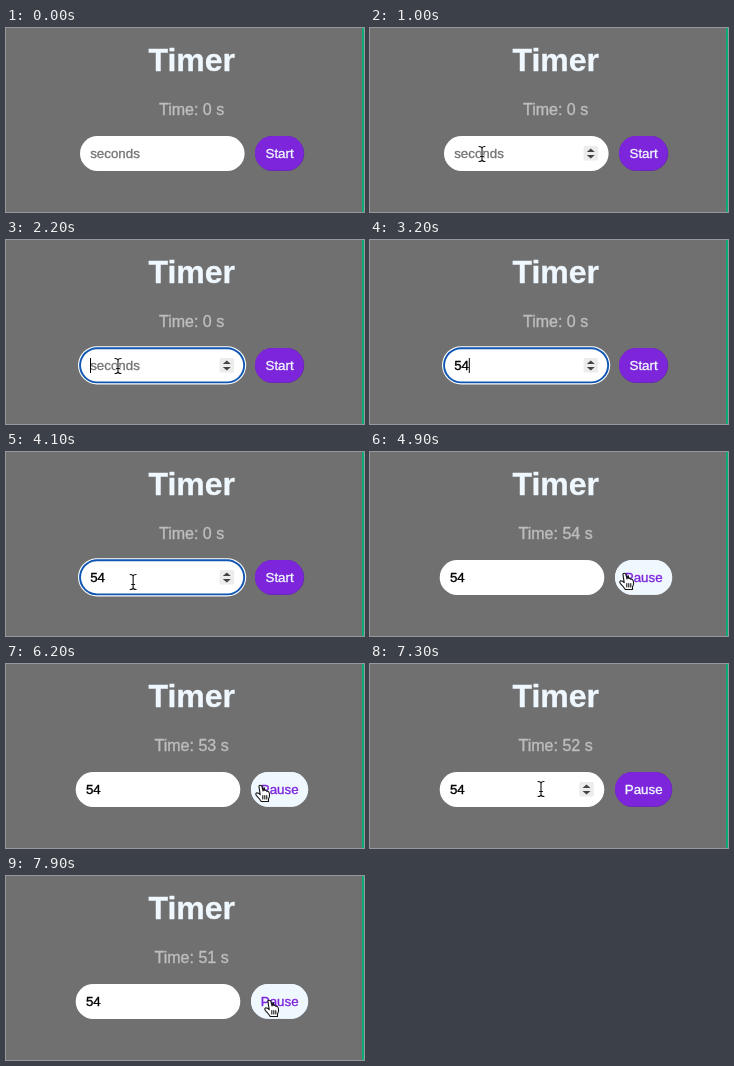
Animation, 358 px wide and 184 px high, one loop 8000 ms. Source, as an HTML page:

```html
<!DOCTYPE html>
<html lang="en">
<head>
<meta charset="utf-8">
<title>Timer</title>
<style>
  html, body { margin: 0; width: 100%; height: 100%; overflow: hidden; background: #707070; }
  svg { display: block; width: 358px; height: 184px; font-family: "Liberation Sans", Arial, sans-serif; font-size: 13.333px; }
  text { fill: currentColor; stroke: currentColor; stroke-width: .35px; }
  .halo { stroke: #fff; stroke-opacity: .8; stroke-width: 2.6; }
  .ink { stroke: #111; stroke-width: 1.1; }
</style>
</head>
<body>
<svg viewBox="0 0 358 184">
  <defs>
    <path id="beamShape" d="M-3-7.5Q0-7.5 0-5.5Q0-7.5 3-7.5M0-5.5V5.5M-3 7.5Q0 7.5 0 5.5Q0 7.5 3 7.5M-1.5 2.5H1.5"/>
  </defs>
  <rect width="358" height="184" fill="#707070"/>
  <rect x="356" width="2" height="184" fill="#0dab77"/>
  <text x="185.7" y="42.8" text-anchor="middle" font-size="32" font-weight="700" color="#f0f8ff">Timer</text>
  <text id="time" x="185.6" y="87" text-anchor="middle" font-size="16" color="#bebebe"></text>

  <g id="field">
    <g id="ring">
      <rect x="-2" y="106.2" width="168.2" height="38.2" rx="19.1" fill="#fff"/>
      <rect x="-.9" y="107.3" width="166" height="36" rx="18" fill="#0f56b3"/>
      <rect x="1" y="109.2" width="162.2" height="32.2" rx="16.1" fill="#fff"/>
    </g>
    <rect id="plain" y="108" width="164.6" height="35" rx="17.5" fill="#fff"/>
    <text id="value" x="10.2" y="130"></text>
    <rect id="caret" y="118" width="1" height="15"/>
    <g id="spinner">
      <rect x="139.6" y="118" width="14.5" height="14.5" rx="1.5" fill="#ececec"/>
      <path d="M142.8 124 146.8 120.4 150.8 124ZM142.8 127 146.8 130.6 150.8 127Z" fill="#444"/>
    </g>
  </g>

  <rect id="edge" y="108" height="35" rx="17.5"/>
  <rect id="face" y="108" height="34.5" rx="17.2"/>
  <text id="label" y="130" text-anchor="middle"></text>

  <g id="cursor" stroke-linejoin="round" stroke-linecap="round">
    <g id="beam" fill="none">
      <use href="#beamShape" class="halo"/>
      <use href="#beamShape" class="ink"/>
    </g>
    <path id="arrow" d="M0 0V13.5L3.2 10.6 5.4 15.2 7.5 14.2 5.4 9.8H9.8Z" stroke="#fff"/>
    <g id="hand" class="ink" fill="#fff">
      <path d="M-1.6 1.2Q-.5-.5 1.3 1L2.6 6Q4-.1 4 5.2Q5.8 4.9 6.2 6.3Q8.2 6 8.8 8Q9.8 11 8 14V16.5H.8Q-1 13.5-4.3 10.3Q-5.3 8.2-3.6 7.8Q-2 8-.3 9.6Z"/>
      <path d="M2.3 10.5V14M4.3 10.5V14M6.3 10.5V14"/>
    </g>
  </g>
</svg>
<script>
const LOOP = 8000, STEP = 100, BLINK = 500;
const ENTER = 100, FOCUS = 1200, FIRST_KEY = 2900, SECOND_KEY = 3200, WAKE = 4000, BLUR = 4600, START = 4700;
const PURPLE = "#7d25da", PALE = "#f0f8ff";

const $ = id => document.getElementById(id);
const show = (id, on) => $(id).setAttribute("display", on ? "inline" : "none");
const set = (id, attrs) => {
  for (const key in attrs) $(id).setAttribute(key, attrs[key]);
};
const clamp = k => Math.min(1, Math.max(0, k));
const ease = k => k * k * (3 - 2 * k);

// Each move eases from the previous resting point; sag bends it downwards
const moves = [
  { start: ENTER, end: 300, x: 263, y: 157 },
  { start: 300, end: 400, x: 237, y: 134 },
  { start: 600, end: 1000, x: 112, y: 126 },
  { start: WAKE, end: 4500, x: 257.5, y: 121, sag: 14 },
  { start: 4500, end: START, x: 254.5, y: 121 },
  { start: 6200, end: 6600, x: 100, y: 126 },
  { start: 6600, end: 6800, x: 171, y: 125 },
  { start: 7300, end: 7900, x: 263.5, y: 124, sag: 16 }
];

function pointerAt(t) {
  let x = 88, y = 79;
  for (const m of moves) {
    const k = ease(clamp((t - m.start) / (m.end - m.start)));
    x += (m.x - x) * k;
    y += (m.y - y) * k + (m.sag || 0) * Math.sin(Math.PI * k);
  }
  return [x, y];
}

function render(t) {
  const running = t >= START;
  const left = running ? 54 - Math.floor((t - START) / 1000) : 0;
  $("time").textContent = `Time: ${left} s`;

  const fieldX = running ? 69.7 : 74;
  const buttonX = running ? 245 : 249;
  const buttonW = running ? 57.3 : 49.2;
  const [x, y] = pointerAt(t);
  const visible = t >= ENTER && (t < FIRST_KEY || t >= WAKE);
  const within = (from, width) => visible && y > 108 && y < 143 && x > from && x < from + width;
  const overField = within(fieldX, 165);
  const overButton = within(buttonX, buttonW);

  const focused = t >= FOCUS && t < BLUR;
  const typed = "54".slice(0, (t >= FIRST_KEY) + (t >= SECOND_KEY));
  const lastInput = [FOCUS, FIRST_KEY, SECOND_KEY][typed.length];
  $("value").textContent = typed || "seconds";
  set("value", { color: typed ? "#000" : "#757575" });
  set("field", { transform: `translate(${fieldX} 0)` });
  set("caret", { x: 10 + typed.length * 7.4 });
  show("ring", focused);
  show("plain", !focused);
  show("caret", focused && Math.floor((t - lastInput) / BLINK) % 2 === 0);
  show("spinner", focused || overField);

  set("edge", { x: buttonX, width: buttonW, fill: overButton ? "#dfe6ef" : "#5a2a9c" });
  set("face", { x: buttonX, width: buttonW - .5, fill: overButton ? PALE : PURPLE });
  set("label", { x: buttonX + buttonW / 2, color: overButton ? PURPLE : PALE });
  $("label").textContent = running ? "Pause" : "Start";

  show("cursor", visible);
  set("cursor", { transform: `translate(${x} ${y})` });
  show("beam", overField);
  show("hand", overButton);
  show("arrow", !overField && !overButton);
}

const origin = performance.now();
function tick() {
  const t = (performance.now() - origin) % LOOP;
  render(Math.floor(t / STEP) * STEP);
  requestAnimationFrame(tick);
}
tick();
</script>
</body>
</html>
```
